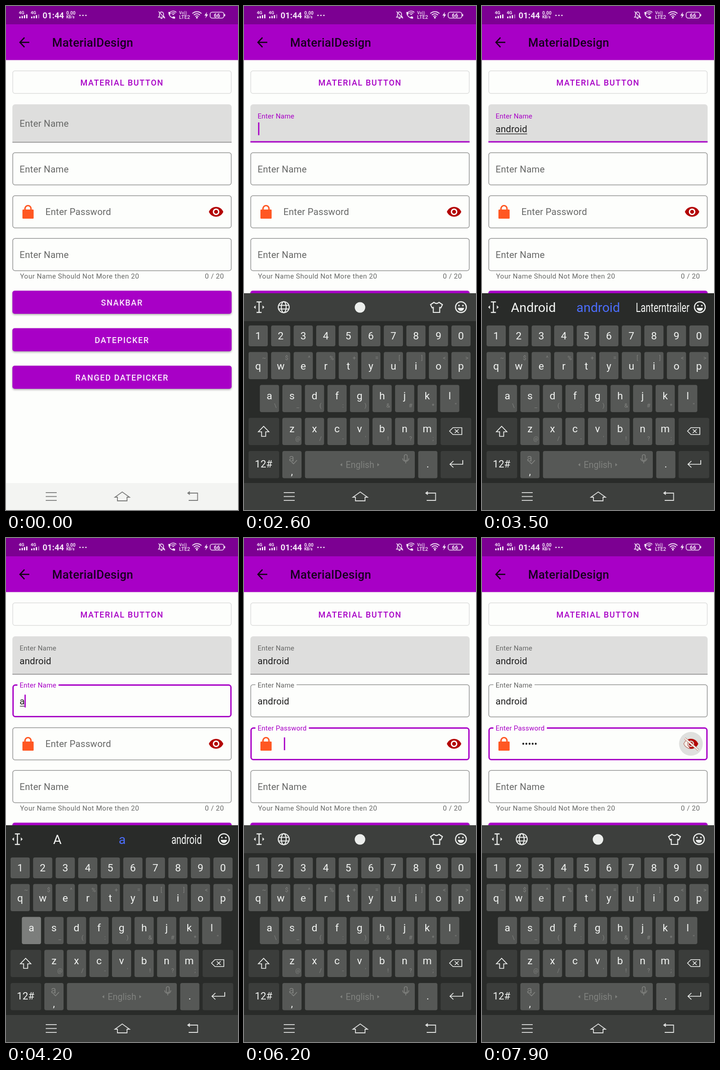
Write an HTML page with a canvas that moves like this. It is 508x1102 px and loops after 8000 ms.

```html
<!DOCTYPE html>
<html lang="en">
<head>
<meta charset="utf-8">
<title>Text fields</title>
<style>
html, body { margin: 0; width: 100%; height: 100%; overflow: hidden; background: #fdfefc; }
canvas { display: block; width: 508px; height: 1102px; }
</style>
</head>
<body>
<canvas id="stage" width="508" height="1102"></canvas>
<script>
const c = document.getElementById('stage').getContext('2d');
const LOOP = 8000, TICK = 100;
const FOCUS = [1400, 3750, 5650];
const TYPING = [
  { word: 'android', start: 2650, step: 90 },
  { word: 'android', start: 4180, step: 90 },
  { word: '12345', start: 6350, step: 150 }
];
const KEYS_IN = 1580, MASK_AT = 7450, TOGGLE = 7780;
const PURPLE = '#a800c6', PAPER = '#fdfefc', HINT = '#666766', RED = '#b30606';
const EYE = new Path2D('M12 4.5C7 4.5 2.73 7.61 1 12c1.73 4.39 6 7.5 11 7.5s9.27-3.11 11-7.5c-1.73-4.39-6-7.5-11-7.5zM12 17c-2.76 0-5-2.24-5-5s2.24-5 5-5 5 2.24 5 5-2.24 5-5 5zm0-8c-1.66 0-3 1.34-3 3s1.34 3 3 3 3-1.34 3-3-1.34-3-3-3z');
const CALL = new Path2D('M6.6 10.8c1.4 2.8 3.8 5.1 6.6 6.6l2.2-2.2c.3-.3.7-.4 1-.2 1.1.4 2.3.6 3.6.6.6 0 1 .4 1 1V20c0 .6-.4 1-1 1C10.600 21 3 13.400 3 4c0-.6.5-1 1-1h3.500c.6 0 1 .4 1 1 0 1.300.2 2.500.6 3.600.1.3 0 .7-.3 1z');

const clamp = v => Math.max(0, Math.min(1, v));
const ease = v => { v = clamp(v); return v * v * (3 - 2 * v); };
const mix = (a, b, p) => a + (b - a) * p;

function text(s, x, y, size, color, { align = 'left', weight = 400, gap = 0 } = {}) {
  c.font = `${weight} ${size}px Roboto, sans-serif`;
  c.letterSpacing = gap + 'px';
  c.textAlign = align;
  c.fillStyle = color;
  c.fillText(s, x, y);
  return c.measureText(s).width;
}
function rect(x, y, w, h, color) {
  c.fillStyle = color;
  c.fillRect(x, y, w, h);
}
function box(x, y, w, h, r, color) {
  c.beginPath();
  c.roundRect(x, y, w, h, r);
  c.fillStyle = color;
  c.fill();
}
function frame(x, y, w, h, r, color, lw) {
  c.beginPath();
  c.roundRect(x, y, w, h, r);
  c.strokeStyle = color;
  c.lineWidth = lw;
  c.stroke();
}
function line(color, lw, ...pts) {
  c.beginPath();
  pts.forEach(([x, y]) => c.lineTo(x, y));
  c.strokeStyle = color;
  c.lineWidth = lw;
  c.stroke();
}
function disc(x, y, r, color) {
  c.beginPath();
  c.arc(x, y, r, 0, 7);
  c.fillStyle = color;
  c.fill();
}
function arc(x, y, r, a, b, color, lw) {
  c.beginPath();
  c.arc(x, y, r, a, b);
  c.strokeStyle = color;
  c.lineWidth = lw;
  c.stroke();
}
function poly(color, ...pts) {
  c.beginPath();
  pts.forEach(([x, y]) => c.lineTo(x, y));
  c.fillStyle = color;
  c.fill();
}

const typed = (i, t) => {
  const { word, start, step } = TYPING[i];
  return t < start ? '' : word.slice(0, Math.floor((t - start) / step) + 1);
};
const active = t => FOCUS.findLastIndex(f => t >= f);

function cursorOn(i, t) {
  const { word, start, step } = TYPING[i];
  let last = FOCUS[i];
  if (t >= start) last = start + step * Math.min(word.length - 1, Math.floor((t - start) / step));
  return (t - last) % 500 < 250;
}

function pressedKey(t) {
  for (const { word, start, step } of TYPING) {
    const n = Math.floor((t - start) / step);
    if (n >= 0 && n < word.length) return word[n];
  }
}

function statusBar(t) {
  const w = '#f4e6f7', bold = { weight: 700 };
  rect(0, 0, 508, 40, '#7c0092');
  [28, 54].forEach((x, n) => {
    text('4G', x, 18, 9.5, w, bold);
    for (let i = 0; i < 4; i++)
      box(x + 1 + i * 5, 23 - i * 1.6, 3, 4 + i * 1.6, 1, n && i === 3 ? '#a95fb8' : w);
  });
  text('01:44', 80, 27, 18.3, w, bold);
  text(t >= 4300 && t < 5300 ? '0.10' : '0.00', 132, 18.500, 10, w, bold);
  text('KB/s', 132, 27, 8.3, w, bold);
  for (let i = 0; i < 3; i++) disc(162 + i * 6.5, 20.5, 1.6, w);

  // muted bell
  c.beginPath();
  c.moveTo(334, 24.5);
  c.lineTo(336, 22);
  c.lineTo(336, 18);
  c.bezierCurveTo(336, 11.500, 345, 11.500, 345, 18);
  c.lineTo(345, 22);
  c.lineTo(347, 24.5);
  c.closePath();
  c.strokeStyle = w;
  c.lineWidth = 1.6;
  c.stroke();
  line(w, 1.6, [334, 12], [348, 27]);
  line(w, 2, [338.500, 27], [342.500, 27]);

  // call over wireless
  c.save();
  c.translate(353, 10.500);
  c.scale(.82, .82);
  c.fillStyle = w;
  c.fill(CALL);
  c.restore();
  for (const r of [3, 6.5, 10]) arc(366, 21, r, -2.3, -.8, w, 1.6);

  text('Vo))', 379, 18, 9, w, { weight: 500 });
  text('LTE2', 379, 28, 11, w, { weight: 500 });
  for (const r of [5, 9.5, 14]) arc(418, 26.500, r, -2.35, -.79, w, 2);
  disc(418, 25.500, 2, w);
  poly(w, [440, 13], [434.500, 21], [438, 21], [436.500, 27], [442.500, 18.500], [439, 18.500]);
  frame(447, 13.500, 30, 13, 4.5, w, 1.6);
  box(478, 17.500, 2, 5, 1, w);
  text('66', 462, 24.500, 12, w, { weight: 700, align: 'center' });
}

function appBar() {
  rect(0, 40, 508, 79, PURPLE);
  rect(0, 118, 508, 1.5, '#e9d3ec');
  line('#150318', 2.7, [51, 79.500], [31, 79.500]);
  line('#150318', 2.7, [40.500, 69], [30.500, 79.500], [40.500, 90]);
  text('MaterialDesign', 101, 89, 25.6, '#190020', { weight: 500, gap: .3 });
}

function button(label, y) {
  c.save();
  c.shadowColor = 'rgba(0,0,0,.35)';
  c.shadowBlur = 4;
  c.shadowOffsetY = 2;
  box(14, y, 480, 50.500, 5, PURPLE);
  c.restore();
  text(label, 254, y + 32, 17.8, '#fbeffd', { align: 'center', weight: 500, gap: 1.59 });
}

function label(s, x, y0, y1, p, focused) {
  text(s, mix(x, 29.8, p), mix(y0, y1, p), mix(20.2, 15.1, p), focused ? PURPLE : HINT, { gap: mix(.2, .15, p) });
}

function outline(y, focused, notch) {
  const lw = focused ? 2.9 : 1.5;
  frame(14 + lw / 2, y + lw / 2, 480 - lw, 72 - lw, 5, focused ? PURPLE : '#949594', lw);
  if (notch) rect(25, y - 1, notch, 5, PAPER);
}

function entry(s, base, composing, caret) {
  const w = text(s, 29.8, base, 20.3, '#1c1c1c', { gap: .15 });
  if (s && composing) rect(30.500, base + 3, w - 1, 1.3, '#1c1c1c');
  if (caret) rect(s ? 29.8 + w - .5 : 30.8, base - 21.500, 2.8, 28, PURPLE);
}

function lock() {
  const k = '#ff5722';
  box(36, 445, 24.500, 20, 1.5, k);
  c.beginPath();
  c.moveTo(41.500, 446);
  c.lineTo(41.500, 443);
  c.arc(48.200, 443, 6.5, Math.PI, 0);
  c.lineTo(54.700, 446);
  c.strokeStyle = k;
  c.lineWidth = 3;
  c.stroke();
}

function eye(t) {
  const p = clamp((t - TOGGLE) / 110);
  if (p) disc(460 - 2.5 * p, 450, mix(8, 26, p), '#dfe0de');
  c.save();
  c.translate(442.800, 432.800);
  c.scale(1.435, 1.435);
  if (p < 1) {
    c.fillStyle = RED;
    c.fill(EYE);
  } else {
    c.translate(-1.8, 0);
    c.fillStyle = '#f3eee8';
    c.fill(EYE);
    c.strokeStyle = '#b4685c';
    c.lineWidth = .7;
    c.stroke(EYE);
    c.beginPath();
    [[8, 3], [24, 3], [24, 21], [12, 21], [7, 14]].forEach(q => c.lineTo(...q));
    c.clip();
    c.fillStyle = RED;
    c.fill(EYE);
  }
  c.restore();
  if (p === 1) {
    line('#b4685c', 4.4, [444, 438], [474, 464]);
    line('#f3eee8', 3, [444, 438], [474, 464]);
  }
}

function form(t) {
  const now = active(t);
  const lift = i => ease((t - FOCUS[i]) / 130);
  const caret = i => now === i && cursorOn(i, t);

  frame(14.700, 141.700, 478.600, 49.600, 5, '#dddedd', 1.5);
  text('MATERIAL BUTTON', 254, 173.800, 17.8, PURPLE, { align: 'center', weight: 500, gap: 1.59 });

  box(14, 215, 480, 83.500, [6, 6, 0, 0], '#dededd');
  if (now === 0) rect(14, 295.500, 480, 3, PURPLE);
  else rect(14, 297, 480, 1.6, '#8c8c8c');
  label('Enter Name', 29.8, 263.500, 246, lift(0), now === 0);
  entry(typed(0, t), 276, now === 0, caret(0));

  outline(320, now === 1, 90 * lift(1));
  label('Enter Name', 29.8, 363.500, 327, lift(1), now === 1);
  entry(typed(1, t), 364, now === 1, caret(1));

  outline(414, now === 2, 117 * lift(2));
  label('Enter Password', 86.300, 457, 420.500, lift(2), now === 2);
  lock();
  const pin = typed(2, t), shown = pin && t < MASK_AT ? pin.at(-1) : '';
  const masked = '•'.repeat(pin.length - shown.length) + shown;
  const w = text(masked, 87, 457, 20.3, '#1c1c1c');
  if (caret(2)) rect(87 + w + .3, 436, 2.8, 28, PURPLE);
  eye(t);

  outline(507.500, false, 0);
  label('Enter Name', 29.8, 551, 551, 0, false);
  text('Your Name Should Not More then 20', 30.800, 596, 15.1, HINT, { gap: .47 });
  text('0 / 20', 477.500, 596, 15.1, HINT, { align: 'right', gap: .47 });

  button('SNAKBAR', 622.500);
  button('DATEPICKER', 704.500);
  button('RANGED DATEPICKER', 786.500);
}

function navBar(dark) {
  const k = dark ? '#dfe0df' : '#7a7b7a';
  rect(0, 1043, 508, 59, dark ? '#3d3f3d' : '#f3f4f2');
  for (const y of [1064, 1072.500, 1081]) line(k, 1.8, [87, y], [111, y]);
  line(k, 1.8, [244, 1074], [238.500, 1074], [254.500, 1062.500], [270.500, 1074], [265, 1074],
    [265, 1082], [244, 1082], [244, 1073]);
  line(k, 1.8, [399, 1065], [419.500, 1065], [419.500, 1081], [400, 1081]);
  poly(k, [396.500, 1065], [402.500, 1060.500], [402.500, 1069.500]);
}

function editIcon(x) {
  const k = '#eceeec', y = 658.500;
  line(k, 2.4, [x, y - 11], [x, y + 11]);
  for (const s of [-1, 1]) {
    line(k, 2.4, [x - 5.5, y + 11.500 * s], [x + 5.5, y + 11.500 * s]);
    poly(k, [x + 11.500 * s, y], [x + 7.500 * s, y - 4], [x + 7.500 * s, y + 4]);
  }
}
function smiley(x) {
  const k = '#eceeec';
  arc(x, 658.500, 11.800, 0, 7, k, 2.4);
  disc(x - 4.3, 655, 1.8, k);
  disc(x + 4.3, 655, 1.8, k);
  c.beginPath();
  c.arc(x, 660, 6.8, 0, Math.PI);
  c.fillStyle = k;
  c.fill();
}

function toolbar() {
  const k = '#eceeec';
  rect(0, 628, 508, 61, '#3d3f3d');
  editIcon(33);
  arc(87, 658.500, 12, 0, 7, k, 2.2);
  c.beginPath();
  c.ellipse(87, 658.500, 5.3, 12, 0, 0, 7);
  c.stroke();
  for (const d of [-4, 4]) line(k, 2, [76, 658.500 + d], [98, 658.500 + d]);
  disc(254, 659, 11.500, k);
  c.beginPath();
  c.moveTo(416, 648);
  c.quadraticCurveTo(421.500, 653, 427, 648);
  [[434.500, 653], [431, 660], [428.500, 659], [428.500, 670], [414.500, 670],
    [414.500, 659], [412, 660], [408.500, 653]].forEach(q => c.lineTo(...q));
  c.closePath();
  c.lineWidth = 2.2;
  c.stroke();
  smiley(475);
}

function suggestions(s) {
  const mid = { align: 'center' };
  editIcon(25);
  text(s[0].toUpperCase() + s.slice(1), 112.500, 669, 28.3, '#f4f6f4', mid);
  text(s, 254.500, 669, 28.3, '#4b6dfb', mid);
  c.save();
  c.translate(395.500, 669);
  c.scale(.7, 1);
  text(s.length < 7 ? 'android' : 'Lanterntrailer', 0, 0, 28.3, '#f4f6f4', mid);
  c.restore();
  smiley(477);
}

const ROWS = [
  { keys: '1234567890', hints: '', x: 10, y: 698.500, h: 45.500, base: 728.500 },
  { keys: 'qwertyuiop', hints: '~$^%+=[]<>', x: 10, y: 756.500, h: 59.500, base: 794.500, hintBase: 774 },
  { keys: 'asdfghjkl', hints: '\\_(:)&#*"', x: 34.700, y: 828.500, h: 59.500, base: 860, hintBase: 878 },
  { keys: 'zxcvbnm', hints: "@/-'!?;", x: 84, y: 900.500, h: 59.500, base: 932, hintBase: 950 }
];

function keyboard(t) {
  const ink = '#f2f4f2', soft = '#80827f', plain = '#565856', dark = '#3b3d3b';
  const mid = { align: 'center' };
  const down = pressedKey(t);
  rect(0, 628, 508, 415, '#292b29');
  const now = active(t), word = now < 2 ? typed(now, t) : '';
  if (word) suggestions(word);
  else toolbar();

  for (const r of ROWS) {
    [...r.keys].forEach((ch, i) => {
      const x = r.x + i * 49.350;
      box(x, r.y, 42, r.h, 4, ch === down ? '#7c7e7c' : plain);
      text(ch, x + 21, r.base, 22.500, ink, mid);
      if (r.hints) text(r.hints[i], x + 34, r.hintBase, 13, soft, mid);
    });
  }
  for (const y of [900.500, 973]) {
    box(10, y, 67, 59.500, 4, dark);
    box(430.500, y, 67, 59.500, 4, dark);
  }
  box(84, 973, 42, 59.500, 4, plain);
  box(133.500, 973, 240.500, 59.500, 4, plain);
  box(381.500, 973, 42, 59.500, 4, plain);

  // shift
  line(ink, 1.7, [38.500, 931], [31.500, 931], [43, 919], [54.500, 931], [47.500, 931],
    [47.500, 941], [38.500, 941], [38.500, 930]);
  // delete
  line(ink, 1.6, [450, 929.500], [457.500, 922], [477, 922], [477, 937], [457.500, 937], [449.500, 929]);
  line(ink, 1.6, [461.500, 925.500], [470, 933.500]);
  line(ink, 1.6, [470, 925.500], [461.500, 933.500]);
  // enter
  line(ink, 1.7, [479, 993], [479, 1002], [451, 1002]);
  line(ink, 1.7, [458.500, 995], [451, 1002], [458.500, 1009]);

  text('12#', 43, 1009, 22, ink, mid);
  text('a', 104, 996, 22, soft, mid);
  line(soft, 1.8, [104, 997], [108.500, 1001], [116, 993]);
  text(',', 105, 1025, 22, ink, mid);
  text('.', 402.500, 1009, 22, ink, mid);
  text('English', 254, 1010, 19.3, soft, mid);
  poly(soft, [210.500, 1003], [215, 999.500], [215, 1006.500]);
  poly(soft, [296.500, 1003], [292, 999.500], [292, 1006.500]);
  frame(351, 981, 6.500, 13, 3.2, soft, 1.6);
  arc(354.200, 989, 6.8, 0, Math.PI, soft, 1.6);
  line(soft, 1.6, [354.200, 996], [354.200, 1000]);
}

function draw(t) {
  rect(0, 0, 508, 1102, PAPER);
  statusBar(t);
  appBar();
  form(t);
  const p = clamp((t - KEYS_IN) / 220);
  if (p) {
    c.save();
    c.beginPath();
    c.rect(0, 0, 508, 1043);
    c.clip();
    c.translate(0, 415 * (1 - p) ** 2);
    keyboard(t);
    c.restore();
  }
  navBar(p > 0);
}

function tick() {
  const t = performance.now() % LOOP;
  draw(Math.floor(t / TICK) * TICK);
  requestAnimationFrame(tick);
}
tick();
</script>
</body>
</html>
```
